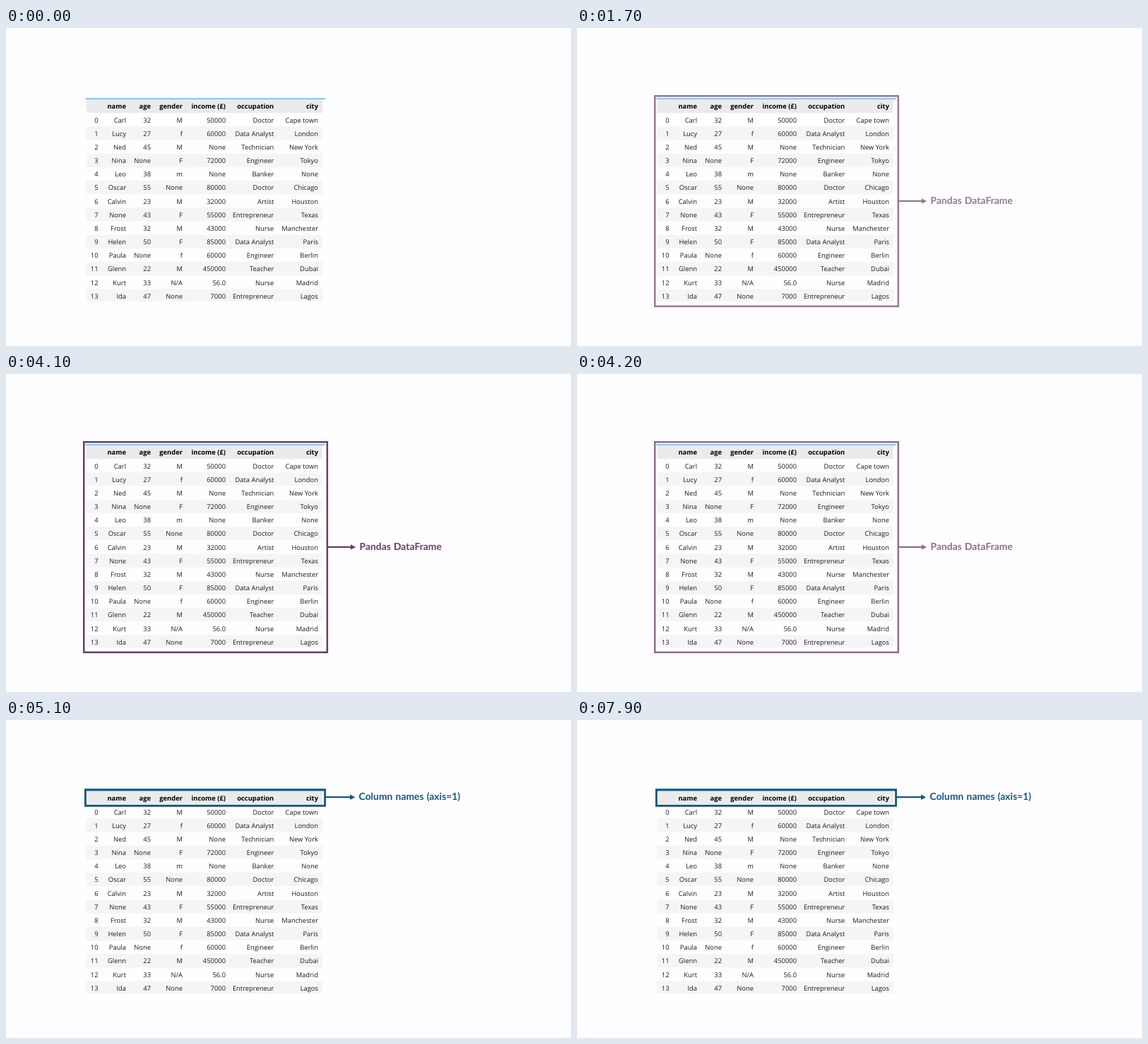
Recreate the animation shown at these times as an HTML page. Size 800x450 px, loop 8000 ms.

```html
<!DOCTYPE html>
<html lang="en">
<head>
<meta charset="utf-8">
<title>DataFrame anatomy</title>
<style>
  html, body { margin: 0; width: 100%; height: 100%; overflow: hidden; background: #fefdff; }
  svg { display: block; width: 800px; height: 450px; text-rendering: geometricPrecision; }
  #table { font: 9.4px "Open Sans", "Noto Sans", sans-serif; fill: #1c1c1c; text-anchor: end; }
  #table .head { font-weight: 700; fill: #000; }
  .note { font: 700 13.9px Lato, sans-serif; word-spacing: .8px; fill: var(--ink); }
  .note rect { fill: none; stroke: var(--ink); stroke-width: 2.5; }
  .note .shaft { stroke: var(--ink); stroke-width: 2.2; }
  #frame { --ink: #40103f; opacity: 0; animation: frame 8s step-end infinite; }
  #columns { --ink: #14587f; opacity: 0; animation: columns 8s step-end infinite; }
  #columns rect { stroke-width: 2.8; }

  /* Fades advance once every 100 ms (1.25%). */
  @keyframes frame {
    0% { opacity: 0; }
    18.75% { opacity: .18; }
    20% { opacity: .37; }
    21.25% { opacity: .56; }
    22.5% { opacity: .75; }
    23.75% { opacity: .93; }
    25% { opacity: 1; }
    51.25% { opacity: .8; }
    52.5% { opacity: .6; }
    53.75% { opacity: .4; }
    55% { opacity: .2; }
    56.25%, 100% { opacity: 0; }
  }
  @keyframes columns {
    0% { opacity: 0; }
    63.75%, 100% { opacity: 1; }
  }
</style>
</head>
<body>
<svg viewBox="0 0 800 450">
  <g id="table"></g>
  <g id="frame" class="note">
    <rect x="110.25" y="96.25" width="344.6" height="297.6"/>
    <path class="shaft" d="M455 244.9H489"/>
    <path d="M488 241.2L495.3 244.9L488 248.6Z"/>
    <text x="500.5" y="249.4">Pandas DataFrame</text>
  </g>
  <g id="columns" class="note">
    <rect x="112.4" y="98.6" width="339.2" height="22.8"/>
    <path class="shaft" d="M452 109.2H488"/>
    <path d="M487 105.5L494.3 109.2L487 112.9Z"/>
    <text x="499.6" y="113.3">Column names (axis=1)</text>
  </g>
</svg>
<script>
  const rows = `|name|age|gender|income (£)|occupation|city
0|Carl|32|M|50000|Doctor|Cape town
1|Lucy|27|f|60000|Data Analyst|London
2|Ned|45|M|None|Technician|New York
3|Nina|None|F|72000|Engineer|Tokyo
4|Leo|38|m|None|Banker|None
5|Oscar|55|None|80000|Doctor|Chicago
6|Calvin|23|M|32000|Artist|Houston
7|None|43|F|55000|Entrepreneur|Texas
8|Frost|32|M|43000|Nurse|Manchester
9|Helen|50|F|85000|Data Analyst|Paris
10|Paula|None|f|60000|Engineer|Berlin
11|Glenn|22|M|450000|Teacher|Dubai
12|Kurt|33|N/A|56.0|Nurse|Madrid
13|Ida|47|None|7000|Entrepreneur|Lagos`.split("\n").map(line => line.split("|"));

  const rightEdges = [130.5, 170, 205, 250, 311, 379.3, 442];
  const pitch = 19.17, tableTop = 101, tableBottom = 387;
  const tableGroup = document.getElementById("table");

  function add(tag, attrs, text = "") {
    const el = document.createElementNS("http://www.w3.org/2000/svg", tag);
    for (const key in attrs) el.setAttribute(key, attrs[key]);
    el.textContent = text;
    tableGroup.append(el);
  }

  function band(y, height, fill) {
    add("rect", { x: 113.5, y, width: 334.5, height, fill });
  }

  rows.forEach((cells, i) => {
    const y = tableTop + i * pitch;
    if (i === 0) band(y, pitch, "#ebeaec");
    else if (i % 2 === 0) band(y, Math.min(pitch, tableBottom - y), "#f5f4f6");
    cells.forEach((cell, c) => {
      const attrs = { x: rightEdges[c], y: y + 13.4 };
      if (i === 0) attrs.class = "head";
      add("text", attrs, cell);
    });
  });
  add("rect", { x: 112.5, y: 99.5, width: 339.5, height: 1.2, fill: "#3ba6e8" });
</script>
</body>
</html>
```
